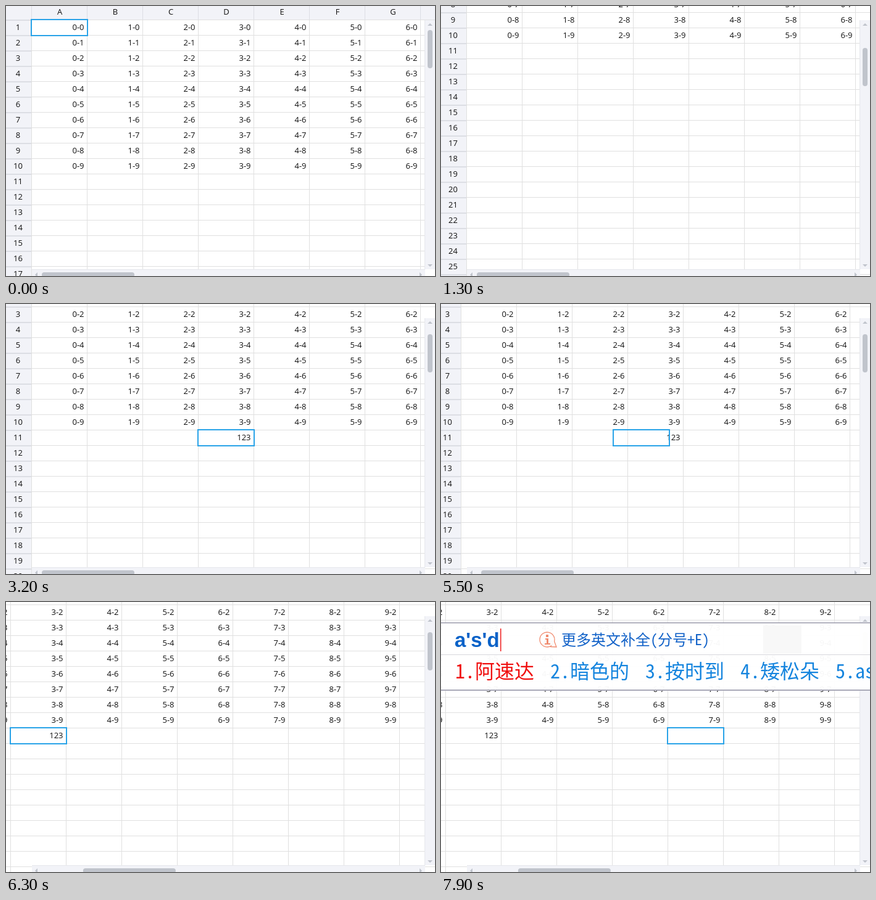
An HTML page with a canvas that plays this animation: 695 by 438 pixels, repeating every 8000 ms.

```html
<!DOCTYPE html>
<html lang="zh">
<head>
<meta charset="utf-8">
<title>Spreadsheet</title>
<style>
  html, body { margin: 0; width: 100%; height: 100%; overflow: hidden; background: #fff; }
  canvas { display: block; }
</style>
</head>
<body>
<canvas id="stage" width="695" height="438"></canvas>
<script>
const ctx = document.getElementById('stage').getContext('2d');
const WIDTH = 695, HEIGHT = 438, LOOP = 8000, TICK = 100;
const COL_W = 90, ROW_H = 25, LEFT = 41, TOP = 22;
const HEADER = '#f2f3f8', HEADER_LINE = '#dcdee4', GRID = '#e0e0e0', THUMB = '#c0c4cc', ACCENT = '#29a3e8';
const CELL_FONT = '13px "Open Sans", "Noto Sans", sans-serif';
const CJK = '"Noto Sans Mono CJK SC", "Noto Sans CJK SC", "Noto Sans CJK", monospace';

// The sheet is eased, so it trails the scroll bars and the selection box.
const scrollY = { start: 600, sheet: [110, 380, 640, 759, 759, 590, 400, 212, 100, 68],
                  bar: [180, 460, 700, 759, 759, 540, 350, 198, 80, 68] };
const scrollX = { start: 5500, sheet: [9, 48, 90, 135, 180, 222, 260, 290, 304],
                  bar: [32, 74, 118, 162, 206, 244, 278, 304, 304] };

const candidates = [
  ['啊', '阿', '吖', '锕', '呵'],
  ['按时', '暗示', '按说', '碍事', 'as'],
  ['阿速达', '暗色的', '按时到', '矮松朵', 'asd']
];
const typedPinyin = ['a', "a's", "a's'd"];

const tickSince = (t, start) => Math.floor((t - start) / TICK);

function stepped(values, start, t) {
  return t < start ? 0 : values[Math.min(tickSince(t, start), values.length - 1)];
}

function rect(x, y, w, h, color) {
  ctx.fillStyle = color;
  ctx.fillRect(x, y, w, h);
}

function text(str, x, y, align = 'left', color = '#111', font = CELL_FONT) {
  ctx.font = font;
  ctx.textAlign = align;
  ctx.fillStyle = color;
  ctx.fillText(str, x, y);
}

function shape(points, color) {
  ctx.fillStyle = color;
  ctx.beginPath();
  points.forEach(([x, y]) => ctx.lineTo(x, y));
  ctx.fill();
}

function thumb(x, y, w, h) {
  ctx.fillStyle = THUMB;
  ctx.beginPath();
  ctx.roundRect(x, y, w, h, 4);
  ctx.fill();
}

function drawSheet(t, sx, sy) {
  const firstRow = Math.max(0, Math.floor((sy - TOP) / ROW_H));
  const entry = '123'.slice(0, Math.max(0, tickSince(t, 3000) + 1));
  ctx.save();
  ctx.translate(-sx, -sy);
  rect(0, 0, LEFT, sy + HEIGHT, HEADER);
  rect(0, 0, sx + WIDTH, TOP, HEADER);

  for (let col = 0; col < 12; col++) {
    const x = LEFT + col * COL_W;
    rect(x, TOP, 1, sy + HEIGHT, GRID);
    rect(x, 0, 1, TOP, HEADER_LINE);
    text(String.fromCharCode(65 + col), x + 46, 14, 'center');
  }
  rect(LEFT, TOP, sx + WIDTH, 1, GRID);
  rect(0, TOP, LEFT, 2, HEADER_LINE);

  for (let row = firstRow; row < firstRow + 20; row++) {
    const y = TOP + row * ROW_H, baseline = y + 17;
    rect(LEFT, y + ROW_H, sx + WIDTH, 1, GRID);
    rect(0, y + ROW_H, LEFT, 2, HEADER_LINE);
    text(row + 1, 19.5, baseline, 'center');
    for (let col = 0; col < 10; col++) {
      const value = row < 10 ? `${col}-${row}` : row === 10 && col === 3 ? entry : '';
      if (value) text(value, LEFT + (col + 1) * COL_W - 4.5, baseline, 'right');
    }
  }
  ctx.restore();
}

function drawSelection(t, barX, barY) {
  const [col, row] = t < 2100 ? [0, 0] : t < 6900 ? [3, 10] : [7, 10];
  ctx.strokeStyle = ACCENT;
  ctx.lineWidth = 2;
  ctx.strokeRect(LEFT + col * COL_W - barX, TOP + row * ROW_H - barY, 91, 26);
}

function drawScrollBars(barX, barY) {
  rect(678, 23, 17, 404, HEADER);
  rect(678, 23, 1, 404, '#e6e7ec');
  rect(42, 427, 637, 11, HEADER);
  rect(42, 427, 637, 1, '#e6e7ec');
  shape([[683, 32], [687, 28], [691, 32]], THUMB);
  shape([[683, 419], [687, 423], [691, 419]], THUMB);
  shape([[51, 432], [47, 436], [51, 440]], THUMB);
  shape([[670, 432], [674, 436], [670, 440]], THUMB);
  thumb(683, 39 + barY * 0.1465, 8, 62);
  thumb(58 + barX * 0.22, 432, 150, 8);
}

function drawTip(alpha) {
  const coral = '#f08c70';
  ctx.globalAlpha = alpha;
  ctx.strokeStyle = coral;
  ctx.lineWidth = 1.3;
  ctx.beginPath();
  ctx.arc(172, 61, 12, 0.9, 0.25 + Math.PI * 2);
  ctx.lineTo(187, 73);
  ctx.lineTo(177, 72.5);
  ctx.stroke();
  rect(170, 53, 4, 4, coral);
  rect(169, 59, 5, 2, coral);
  rect(171, 59, 3, 9, coral);
  rect(168, 67, 9, 2, coral);
  text('更多英文补全(分号+E)', 195, 70, 'left', '#1262c8', `300 24px ${CJK}`);
  ctx.globalAlpha = 1;
}

function drawInputPanel(t) {
  const stage = Math.min(tickSince(t, 7100), 2);
  rect(0, 33, WIDTH, 110, 'rgba(255,255,255,.96)');
  rect(522, 38, 62, 46, '#f8f8f8');
  rect(0, 33, WIDTH, 1.5, '#9c9cac');
  rect(0, 142, WIDTH, 2, '#a9a9b8');
  rect(0, 85, WIDTH, 1, '#d6d6dc');

  text(typedPinyin[stage], 22, 73, 'left', '#0a62c8', 'bold 33px "Liberation Sans", Arial, sans-serif');
  const caretX = 23 + ctx.measureText(typedPinyin[stage]).width;
  rect(Math.round(caretX), 43, 1.5, 37, '#f02020');

  let x = 23;
  candidates[stage].forEach((word, i) => {
    const color = i ? '#1685de' : '#f01010', font = `300 32px ${CJK}`;
    text(`${i + 1}.`, x, 124, 'left', color, font);
    text(word, x + 32, 124, 'left', color, font);
    x += 58 + word.length * 32;
  });
  if (t >= 7700) drawTip(Math.min(1, (tickSince(t, 7700) + 1) / 3));
}

function draw(t) {
  const sheetX = stepped(scrollX.sheet, scrollX.start, t), barX = stepped(scrollX.bar, scrollX.start, t);
  const sheetY = stepped(scrollY.sheet, scrollY.start, t), barY = stepped(scrollY.bar, scrollY.start, t);
  rect(0, 0, WIDTH, HEIGHT, '#fff');
  drawSheet(t, sheetX, sheetY);
  drawSelection(t, barX, barY);
  drawScrollBars(barX, barY);
  if (t >= 7100) drawInputPanel(t);
}

const begin = performance.now();
function frame() {
  draw((performance.now() - begin) % LOOP);
  requestAnimationFrame(frame);
}
frame();
</script>
</body>
</html>
```
